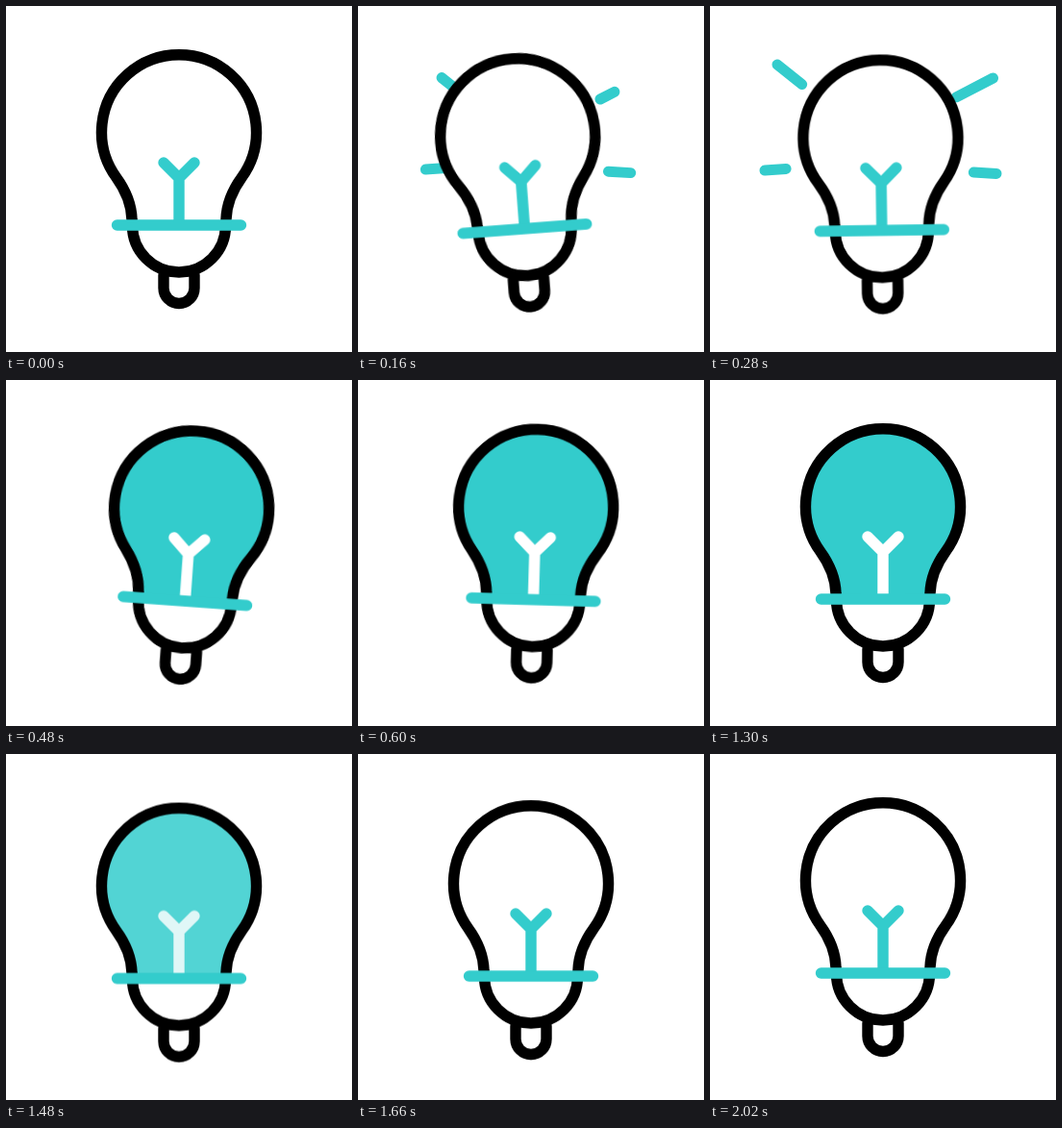
An HTML page that plays this animation: 360 by 360 pixels, repeating every 2.4 s.

```html
<!DOCTYPE html>
<html lang="en">
<head>
<meta charset="utf-8">
<title>Light bulb</title>
<style>
  :root { --teal: #33cccc; }
  html, body { margin: 0; width: 100%; height: 100%; overflow: hidden; background: #fff; }
  svg { display: block; width: 100%; height: 100%; }
  path { fill: none; stroke: #000; stroke-width: 11.4; stroke-linecap: round; stroke-linejoin: round; }
  g, path { animation: 2400ms linear infinite; }

  .press { animation-name: press; }
  .tilt { animation-name: tilt; transform-origin: 180px 315px; }
  .glow { stroke: none; animation-name: glow; }
  .wire { stroke: var(--teal); animation-name: wire; }
  .bar { stroke: var(--teal); }
  .ray { stroke: var(--teal); stroke-width: 11; stroke-dasharray: 1 3; animation-name: shoot; }
  .side { animation-delay: -18ms; }
  .late { animation-delay: -2375ms; }

  @keyframes press {
    0%, 1.667% { transform: translateY(0); animation-timing-function: cubic-bezier(.37, 0, .63, 1); }
    10.833% { transform: translateY(6px); animation-timing-function: cubic-bezier(.333, .667, .667, 1); }
    30.833% { transform: translateY(0); }
    54.167% { transform: translateY(0); animation-timing-function: cubic-bezier(.37, 0, .63, 1); }
    63.333% { transform: translateY(6px); animation-timing-function: cubic-bezier(.333, .667, .667, 1); }
    84.167%, 100% { transform: translateY(0); }
  }
  @keyframes tilt {
    0%, 1.667% { transform: rotate(0deg); animation-timing-function: cubic-bezier(.37, 0, .63, 1); }
    8.333% { transform: rotate(-5deg); animation-timing-function: cubic-bezier(.37, 0, .63, 1); }
    15.833% { transform: rotate(5deg); animation-timing-function: cubic-bezier(.37, 0, .63, 1); }
    30.833%, 100% { transform: rotate(0deg); }
  }
  @keyframes glow {
    0%, 12.5% { fill: #fff; }
    17.5%, 60.833% { fill: var(--teal); }
    66.667%, 100% { fill: #fff; }
  }
  @keyframes wire {
    0%, 12.5% { stroke: var(--teal); }
    17.5% { stroke: #fff; animation-timing-function: step-end; }
    30.833% { stroke: #e8fbfb; animation-timing-function: step-end; }
    54.167%, 60.833% { stroke: #fff; }
    66.667%, 100% { stroke: var(--teal); }
  }
  /* the tip runs out first, then the tail follows */
  @keyframes shoot {
    0%, 3.333% { stroke-dashoffset: 1; opacity: 0; }
    3.334% { stroke-dashoffset: 1; opacity: 1; }
    10% { stroke-dashoffset: 0; opacity: 1; }
    16.666% { stroke-dashoffset: -1; opacity: 1; }
    16.667%, 100% { stroke-dashoffset: -1; opacity: 0; }
  }
</style>
</head>
<body>
<svg viewBox="0 0 360 360">
  <path class="ray" pathLength="1" d="M104.5 88.5L70 61"/>
  <path class="ray late" pathLength="1" d="M252 97L294.5 75"/>
  <path class="ray side" pathLength="1" d="M92 168.6L57 171"/>
  <path class="ray side" pathLength="1" d="M260.5 172.2L298 174.5"/>
  <g class="press">
    <g class="tilt">
      <path class="glow" d="M131 228V222C130.5 206 124 191 114.5 178A80.5 80.5 0 1 1 245.5 178C236 191 229.5 206 229 222V228Z"/>
      <path d="M164 280V293.5A16 16 0 0 0 196 293.5V280"/>
      <path d="M131.5 228.5L131 222C130.5 206 124 191 114.5 178A80.5 80.5 0 1 1 245.5 178C236 191 229.5 206 229 222L228.5 228.5A48.5 48.5 0 0 1 131.5 228.5Z"/>
      <path class="wire" d="M164 163L180 179L196 163M180 179V226"/>
      <path class="bar" d="M115.5 228H244.5"/>
    </g>
  </g>
</svg>
</body>
</html>
```
